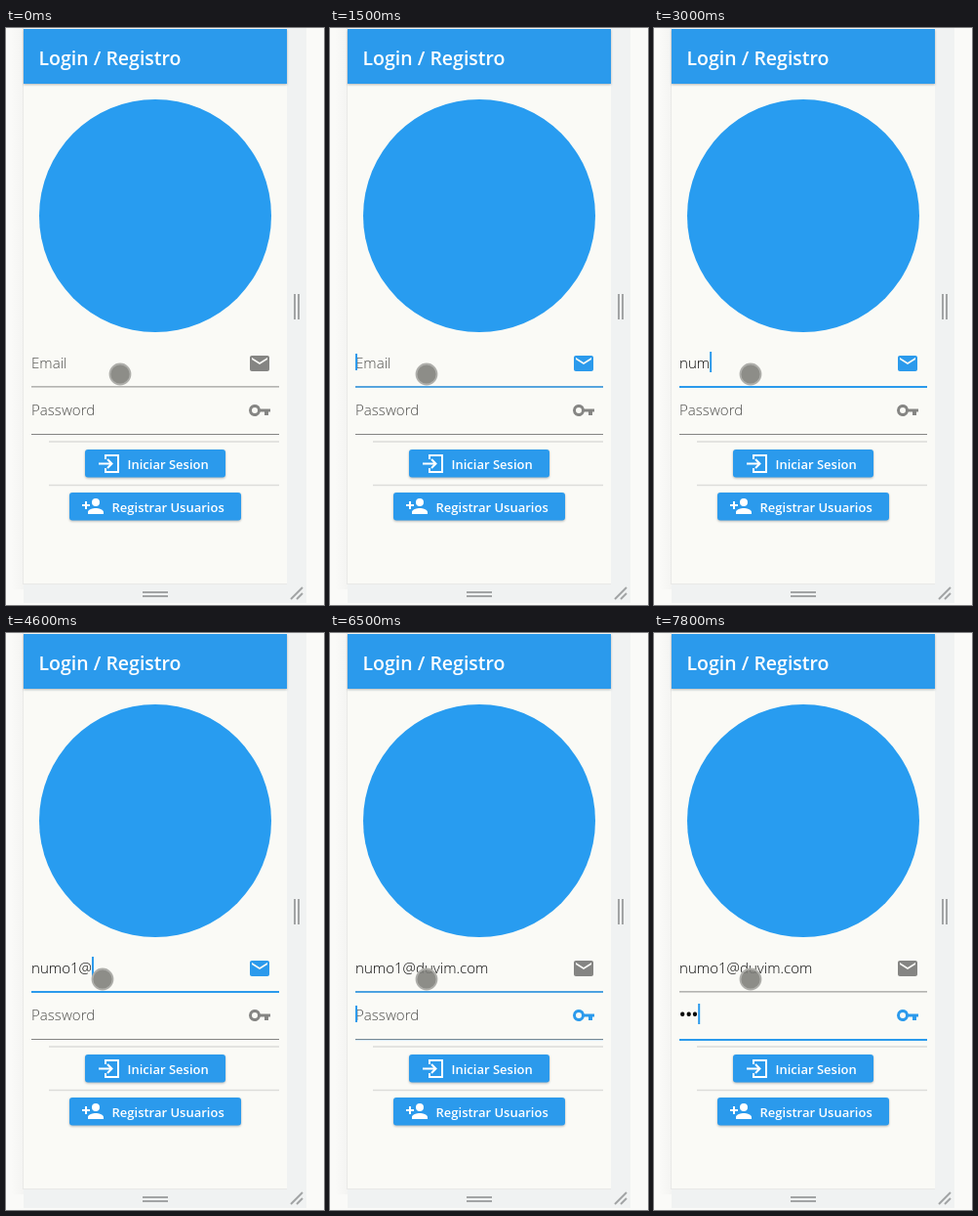
An HTML page that plays this animation: 326x590 px, repeating every 8000 ms.

```html
<!DOCTYPE html>
<html lang="es">
<head>
<meta charset="utf-8">
<title>Login / Registro</title>
<style>
  html, body { margin: 0; width: 100%; height: 100%; overflow: hidden; background: #fafaf8; }
  svg { display: block; width: 326px; height: 590px; font-family: "Open Sans", "Noto Sans", sans-serif; }
  .bar { font-size: 19.5px; font-weight: 600; fill: #fff; }
  .field { font-size: 15.1px; font-weight: 300; }
  .hint { fill: #4c4c4a; }
  .value { fill: #080808; }
  #password .value { font-size: 17px; font-weight: 600; }
  .button { font-size: 13px; font-weight: 600; fill: #fff; }
  .blue { fill: #2b9aec; }
  .raised { filter: drop-shadow(0 1px 1px #0004); }
  .handle { stroke: #a2a4a5; stroke-width: 2; }
</style>
</head>
<body>
<svg viewBox="0 0 326 590">
  <defs>
    <linearGradient id="edge">
      <stop offset="0" stop-color="#fafaf8"/>
      <stop offset="1" stop-color="#f4f4f2"/>
    </linearGradient>
  </defs>
  <rect x="5" width="13" height="574" fill="url(#edge)"/>
  <rect x="18" width="290" height="588" fill="#f0f2f2"/>
  <rect x="17" width="271" height="569" fill="#e9e9e7"/>
  <rect x="18" width="270" height="568" fill="#fafaf6"/>
  <path class="handle" d="M296 272v26M300 272v26M140 577h26M140 581h26"/>
  <path class="handle" d="M292 584l12-12M298 584l6-6"/>

  <rect class="blue raised" x="18" y="1" width="270" height="56"/>
  <text class="bar" x="33.500" y="38">Login / Registro</text>
  <circle cx="153" cy="192" r="119" fill="#289cf0"/>

  <g id="email"></g>
  <g id="password"></g>

  <path d="M44 423h236M44 467.500h236" stroke="#dcdcd9" stroke-width="1.500"/>
  <rect class="blue raised" x="81" y="431" width="144" height="28.500" rx="3"/>
  <path fill="none" stroke="#fff" stroke-width="2" d="M102 441v-4h13v17h-13v-4M95 445.500h13M104 441l4.500 4.500-4.500 4.500"/>
  <text class="button" x="124.500" y="451">Iniciar Sesion</text>
  <rect class="blue raised" x="65" y="475" width="176" height="28.500" rx="3"/>
  <path transform="translate(77 477)" fill="#fff" d="M15 12a4 4 0 1 0 0-8 4 4 0 0 0 0 8zM6 10V7H4v3H1v2h3v3h2v-3h3v-2zM15 14c-2.670 0-8 1.340-8 4v2h16v-2c0-2.660-5.330-4-8-4z"/>
  <text class="button" x="108.500" y="495">Registrar Usuarios</text>

  <circle id="pointer" cy="354" r="10.500" fill="#7d7d79" fill-opacity=".88" stroke="#aeaeaa" stroke-width="1.800"/>
</svg>
<script>
const LOOP = 8000, STEP = 100;
const MAIL = 'M20 4H4c-1.1 0-2 .9-2 2v12c0 1.100.9 2 2 2h16c1.100 0 2-.9 2-2V6c0-1.100-.9-2-2-2zm0 4l-8 5-8-5V6l8 5 8-5z';
const KEY = 'M12.800 10.500a6 6 0 1 0 0 3H17V17h4v-3.500h2v-3zM7 15a3 3 0 1 1 0-6 3 3 0 0 1 0 6z';
const pointer = document.getElementById('pointer');

function makeField(id, top, hint, icon, line) {
  const group = document.getElementById(id);
  group.innerHTML = `
    <text class="field hint" x="26" y="${top + 17}">${hint}</text>
    <text class="field value" x="26" y="${top + 17}"></text>
    <path transform="translate(248 ${top})" d="${icon}"/>
    <rect x="26" y="${line.y}" width="254" height="${line.h}" fill="${line.color}"/>
    <rect class="blue" x="26" y="${line.y}" width="254" height="2"/>
    <rect class="blue" width="2"/>`;
  const [label, value, mark, , focusLine, caret] = group.children;
  return (text, focused, lineAlpha, caretOn) => {
    label.style.display = text ? 'none' : '';
    value.textContent = text;
    mark.setAttribute('fill', focused ? '#2b9aec' : '#858583');
    focusLine.style.opacity = lineAlpha;
    caret.style.display = focused && caretOn ? '' : 'none';
    caret.setAttribute('x', 26 + (text ? value.getComputedTextLength() : 0));
    caret.setAttribute('y', text ? top : top + 2);
    caret.setAttribute('height', text ? 21 : 17);
  };
}

const drawEmail = makeField('email', 331, 'Email', MAIL, { y: 366, h: 1.6, color: '#b4b4b1' });
const drawPassword = makeField('password', 379, 'Password', KEY, { y: 415, h: 1, color: '#858583' });

const address = 'numo1@duvim.com';
const emailKeys = [2600, 2800, 3000, 3500, 3900, 4600, 4900, 5100, 5200, 5300, 5300, 5500, 5600, 5800, 5900];
const passwordKeys = [7400, 7600, 7800];

const ramp = (t, from, to) => Math.min(1, Math.max(0, (t - from) / (to - from)));
const ease = p => p * p * (3 - 2 * p);
const typed = (keys, t) => keys.filter(k => k <= t).length;
const within = (t, from, to) => t >= from && t < to;

function draw(now) {
  const t = Math.floor(now % LOOP / STEP) * STEP;
  const onEmail = within(t, 1500, 6400), onPassword = t >= 6400;
  const caretOn = !within(t, 2100, 2600) && !within(t, 4300, 4600) && !within(t, 7000, 7400);

  drawEmail(address.slice(0, typed(emailKeys, t)), onEmail,
    ramp(t, 1430, 1530) * (1 - ramp(t, 6470, 6600)), caretOn);
  drawPassword('•'.repeat(typed(passwordKeys, t)), onPassword, ramp(t, 6480, 6600), caretOn);
  pointer.setAttribute('cx', 117 - 18 * ease(ramp(t, 600, 1300)));
  requestAnimationFrame(draw);
}
requestAnimationFrame(draw);
</script>
</body>
</html>
```
